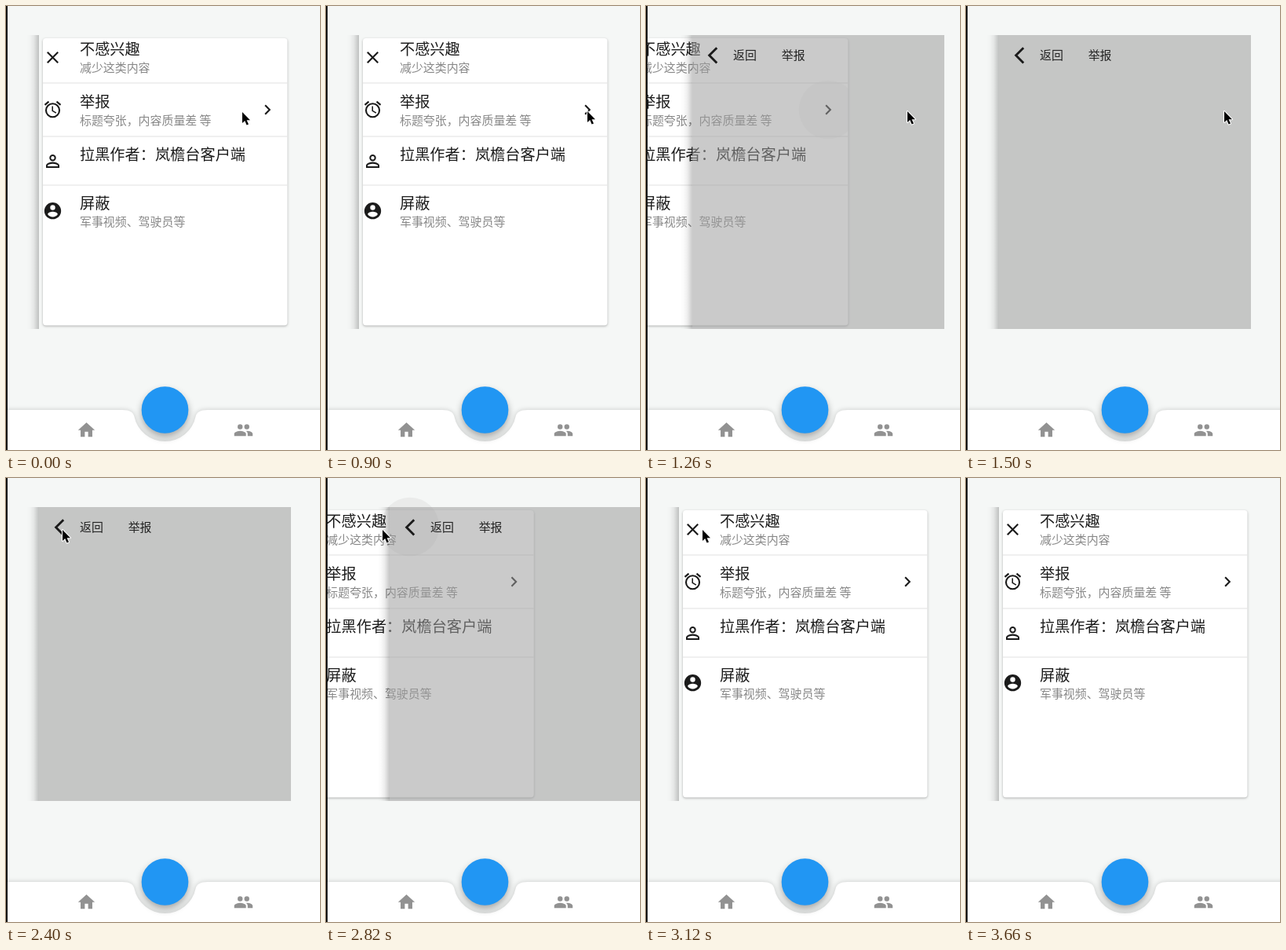
These frames come from a looping animation (400 px wide and 565 px high, 4.08 s). An HTML page with a canvas:

```html
<!DOCTYPE html>
<html lang="zh-CN">
<head>
<meta charset="utf-8">
<title>Page transition</title>
<style>
  html, body { margin: 0; width: 100%; height: 100%; overflow: hidden; background: #f5f7f6; }
  canvas { display: block; width: 400px; height: 565px; }
</style>
</head>
<body>
<canvas id="stage"></canvas>
<script>
const W = 400, H = 565, LOOP = 4080, STEP = 60;
const PUSH = 1090, POP = 2806, DURATION = 300;
const UNIT = 16 / 15; // stage pixels per layout unit
const PAGE = { x: 42, y: 37, w: 320, h: 374 };
const INK = '#1b1b1b', GRAY = '#929292';
const FONT = '"Noto Sans CJK SC", "Noto Sans CJK", "Noto Sans", sans-serif';
const TITLE = 18 * UNIT, BODY = 14 * UNIT;

const canvas = document.getElementById('stage');
const ctx = canvas.getContext('2d');
const dpr = window.devicePixelRatio || 1;
canvas.width = W * dpr;
canvas.height = H * dpr;

const rows = [
  { icon: close, iconY: 65.5, title: '不感兴趣', y: 55, sub: '减少这类内容', line: 98 },
  { icon: alarm, iconY: 131.7, title: '举报', y: 122, sub: '标题夸张，内容质量差 等', line: 166 },
  { icon: person, iconY: 197.5, title: '拉黑作者：岚檐台客户端', y: 189, line: 228 },
  { icon: account, iconY: 260.7, title: '屏蔽', y: 251, sub: '军事视频、驾驶员等' }
];

// Pointer stops: time, x, y
const pointer = [
  [300, 301, 135], [600, 333, 134], [1440, 333, 134], [1500, 329, 134],
  [1560, 226, 100], [1620, 170, 80], [1740, 100, 64], [1860, 63, 56],
  [2040, 76, 68], [2100, 78, 69], [2400, 72, 66], [3300, 72, 66],
  [3420, 51, 53], [3480, 90, 110], [3540, 180, 290], [3600, 292, 519]
];

const clamp = v => Math.max(0, Math.min(1, v));

function bezier(x, x1, y1, x2, y2) {
  if (x <= 0 || x >= 1) return clamp(x);
  const at = (s, a, b) => 3 * (1 - s) * (1 - s) * s * a + 3 * (1 - s) * s * s * b + s * s * s;
  let lo = 0, hi = 1;
  for (let i = 0; i < 24; i++) {
    const mid = (lo + hi) / 2;
    if (at(mid, x1, x2) < x) lo = mid; else hi = mid;
  }
  return at(lo, y1, y2);
}

const ease = x => bezier(x, 0.35, 0.91, 0.33, 0.97);

function at(x, y, draw, scale = 1) {
  ctx.save();
  ctx.translate(x, y);
  ctx.scale(scale, scale);
  draw();
  ctx.restore();
}

const icon = (x, y, draw) => at(x, y, draw, UNIT);

function stroke(d, width, color = INK) {
  ctx.lineWidth = width;
  ctx.strokeStyle = color;
  ctx.stroke(new Path2D(d));
}

function fill(d, color) {
  ctx.fillStyle = color;
  ctx.fill(new Path2D(d));
}

function disc(x, y, r, color) {
  ctx.fillStyle = color;
  ctx.beginPath();
  ctx.arc(x, y, r, 0, Math.PI * 2);
  ctx.fill();
}

function text(str, x, middle, size, color) {
  ctx.font = `${size}px ${FONT}`;
  ctx.fillStyle = color;
  ctx.fillText(str, x, middle + size * 0.38);
}

function shadow(color, blur, dy) {
  ctx.shadowColor = color;
  ctx.shadowBlur = blur * dpr;
  ctx.shadowOffsetY = dy * dpr;
}

// Icons are drawn around their centre
function close() {
  stroke('M-6.3-6.3L6.3 6.3M6.3-6.3L-6.3 6.3', 2);
}

function alarm() {
  stroke('M-8 1a8 8 0 1 0 16 0a8 8 0 1 0-16 0', 2);
  stroke('M-9.4-5.5L-4.7-9.4M9.4-5.5L4.7-9.4', 2);
  stroke('M-.25-4V1.6L4.1 4.2', 1.5);
}

function person() {
  stroke('M-3-4a3 3 0 1 0 6 0a3 3 0 1 0-6 0', 1.9);
  stroke('M-7 7V5C-7 3.2-2.8 2 0 2S7 3.2 7 5V7Z', 1.9);
}

function account() {
  disc(0, 0, 10, INK);
  disc(0, -4, 3, '#fff');
  fill('M-6 4C-6 2-2 .9 0 .9S6 2 6 4A7.2 7.2 0 0 1-6 4Z', '#fff');
}

function chevron() {
  stroke('M-2.7-5.3L2.6 0L-2.7 5.3', 2);
}

function back() {
  stroke('M10.8-9L1.8 0L10.8 9', 2.7);
}

function home() {
  fill('M-2 8V2H2V8H7V0H10L0-9-10 0H-7V8Z', GRAY);
}

function people() {
  disc(-4, -4, 3, GRAY);
  disc(4, -4, 3, GRAY);
  fill('M-11 7V4.5C-11 2.2-6.3 1-4 1S3 2.2 3 4.5V7Z', GRAY);
  fill('M5 7V4.5C5 3 4.2 1.9 3 1.05C7 .8 11 2.3 11 4.5V7Z', GRAY);
}

function edgeShadow(strength) {
  const g = ctx.createLinearGradient(PAGE.x - 16, 0, PAGE.x, 0);
  [[0, 0], [0.3, 0.016], [0.6, 0.07], [1, 0.22]]
    .forEach(([stop, a]) => g.addColorStop(stop, `rgba(0,0,0,${a * strength})`));
  ctx.fillStyle = g;
  ctx.fillRect(PAGE.x - 16, PAGE.y, 16, PAGE.h);
}

function ripple(x, y, t, start, release, peak) {
  const a = peak * clamp((t - start) / 80) * clamp(1 - (t - release) / 200);
  if (a > 0) disc(x, y, 35 * UNIT, `rgba(0,0,0,${a})`);
}

function listPage(t) {
  edgeShadow(1);
  const card = new Path2D();
  card.roundRect(47, 41, 311.5, 365.5, 4);
  ctx.save();
  shadow('rgba(0,0,0,.3)', 3, 1);
  ctx.fillStyle = '#fff';
  ctx.fill(card);
  ctx.restore();

  ctx.save();
  ctx.clip(card);
  ripple(333, 132, t, 1040, 1120, 0.1);
  for (const row of rows) {
    icon(59.5, row.iconY, row.icon);
    text(row.title, 94, row.y, TITLE, INK);
    if (row.sub) text(row.sub, 94, row.y + 23.3, BODY, '#888');
    if (row.line) {
      ctx.fillStyle = '#e2e2e2';
      ctx.fillRect(47, row.line - 0.5, 312, 1);
    }
  }
  icon(333, 132, chevron);
  ctx.restore();
}

function detailPage(t, shade) {
  ripple(68, 62, t, 2660, 2790, 0.055);
  edgeShadow(shade);
  ctx.fillStyle = 'rgba(158,158,158,.54)';
  ctx.fillRect(PAGE.x, PAGE.y, PAGE.w + 1, PAGE.h);
  icon(61.7, 62.8, back);
  text('返回', 94, 62.5, BODY, '#222');
  text('举报', 155.7, 62.5, BODY, '#222');
}

function navBar() {
  ctx.save();
  shadow('rgba(0,0,0,.18)', 6, 0);
  fill('M-20 514H148C158 514 162 517 163.3 522A40 40 0 0 0 241.7 522C243 517 247 514 257 514H420V590H-20Z', '#fff');
  ctx.restore();
  ctx.save();
  shadow('rgba(0,0,0,.32)', 10, 5);
  disc(202.5, 514, 28 * UNIT, '#2196f3');
  ctx.restore();
  icon(102.5, 539.7, home);
  icon(302.5, 539.7, people);
}

function drawPointer(t) {
  if (t > 3600) return;
  const next = pointer.findIndex(p => p[0] > t);
  let [, x, y] = pointer[next < 0 ? pointer.length - 1 : next];
  if (next > 0) {
    const [t0, x0, y0] = pointer[next - 1];
    const k = (t - t0) / (pointer[next][0] - t0);
    x = x0 + (x - x0) * k;
    y = y0 + (y - y0) * k;
  }
  const arrow = 'M0 0V14L3.2 11L5.6 16.6L8 15.6L5.6 10.2H10Z';
  at(x, y, () => {
    ctx.lineJoin = 'round';
    stroke(arrow, 2, '#fff');
    fill(arrow, '#000');
  });
}

function render(t) {
  ctx.setTransform(dpr, 0, 0, dpr, 0, 0);
  ctx.fillStyle = '#f5f7f6';
  ctx.fillRect(0, 0, W, H);

  // The edge shade follows the forward curve in both directions
  const forward = clamp((t - PUSH) / DURATION), reverse = clamp((t - POP) / DURATION);
  const p = ease(forward) - ease(reverse);
  const shade = ease(forward - reverse);
  if (p < 1) at(-PAGE.w / 3 * p, 0, () => listPage(t));
  if (p > 0) at(PAGE.w * (1 - p), 0, () => detailPage(t, shade));

  navBar();
  ctx.fillStyle = '#111';
  ctx.fillRect(0, 0, 2, H);
  drawPointer(t);
}

const begin = performance.now();
function tick() {
  const t = (performance.now() - begin) % LOOP;
  render(Math.floor(t / STEP) * STEP);
  requestAnimationFrame(tick);
}
tick();
</script>
</body>
</html>
```
